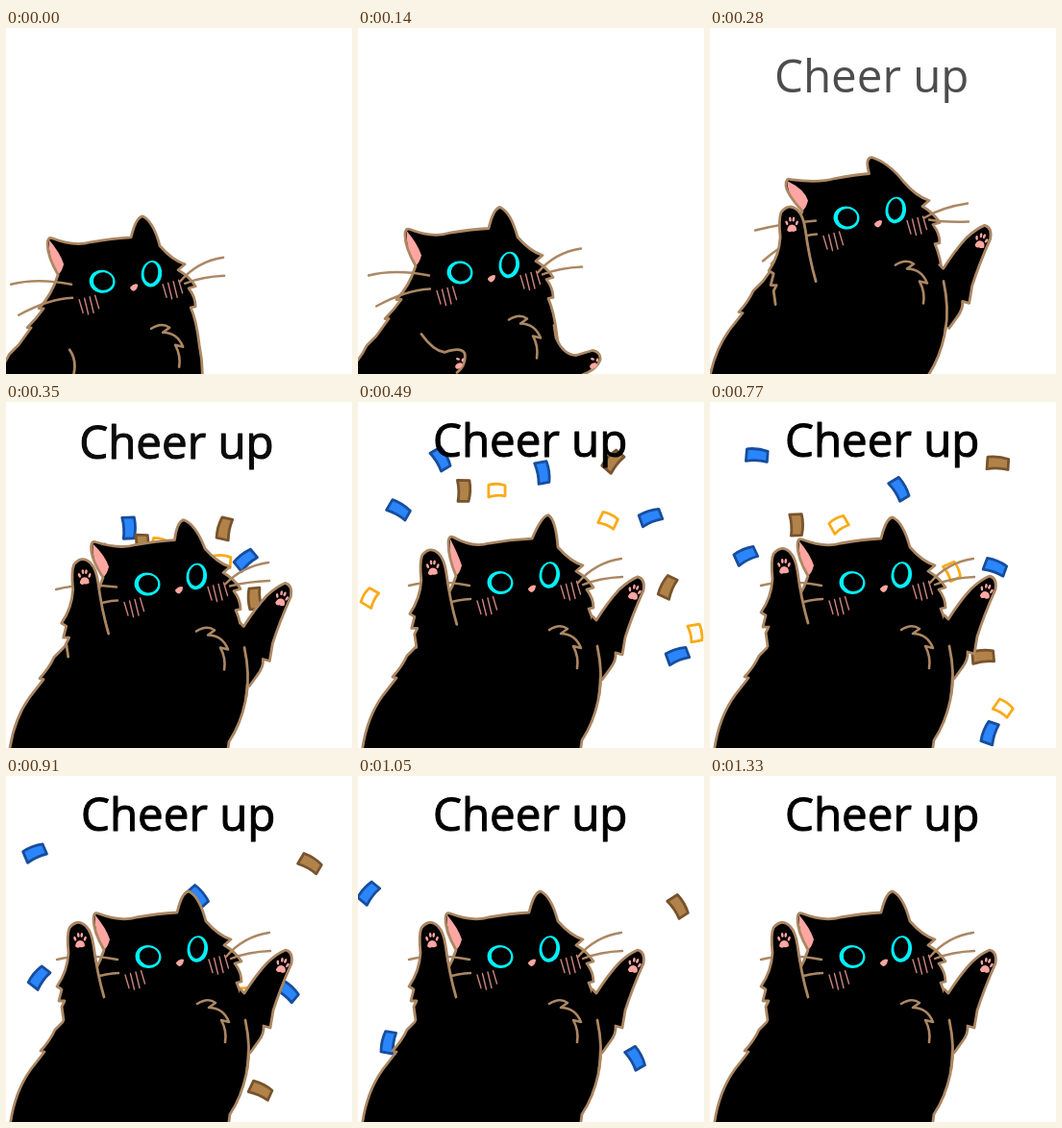
Animation of 360x360 px, one loop 1.4 s. Source, as an HTML page with a canvas:

```html
<!DOCTYPE html>
<html lang="en">
<head>
<meta charset="utf-8">
<title>Cheer up</title>
<style>
  html, body { margin: 0; width: 100%; height: 100%; overflow: hidden; background: #fff; }
  canvas { display: block; width: 100vw; height: 100vh; }
</style>
</head>
<body>
<canvas id="stage" width="360" height="360"></canvas>
<script>
const ctx = document.getElementById('stage').getContext('2d');
const LOOP = 1400, STEP = 70;
const FUR = '#000', LINE = '#ab8763', PINK = '#ffa6a2', CYAN = '#00f2fa', BLUSH = '#c9837e';
const BURST = 280, SPREAD = 490, CLEAR = 1260;

const clamp = (v, low, high) => Math.min(high, Math.max(low, v));
const bump = (t, centre, width) => Math.exp(-(((t - centre) / width) ** 2));

// 1 while the cat crouches, 0 once it has jumped up.
const crouch = t => 1 / (1 + Math.exp((t - 210) / 36));
// Ears and whiskers trail the jump, then swing past.
const sway = t => bump(t, 490, 70) / 2 - bump(t, 280, 60);

function stroke(d, color = LINE, width = 2.8) {
  ctx.strokeStyle = color;
  ctx.lineWidth = width;
  ctx.stroke(new Path2D(d));
}
function fill(d, color = FUR) {
  ctx.fillStyle = color;
  ctx.fill(new Path2D(d));
}
function oval(x, y, rx, ry, angle, color) {
  ctx.fillStyle = color;
  ctx.beginPath();
  ctx.ellipse(x, y, rx, ry, angle, 0, Math.PI * 2);
  ctx.fill();
}
function placed(x, y, angle, draw) {
  ctx.save();
  ctx.translate(x, y);
  ctx.rotate(angle);
  draw();
  ctx.restore();
}

// Where the burst has spread to: x, y and tilt in degrees.
const confetti = [
  { inner: '#2b85fb', edge: '#174d9c', width: 1.15,
    spots: [[86, 59, 65], [192, 73, 85], [42, 112, 35], [304, 120, -15], [332, 264, -15]] },
  { inner: '#b1834a', edge: '#77532d', width: 1.15,
    spots: [[110, 92, 95], [265, 62, -45], [322, 193, -60]] },
  { inner: '#fff', edge: '#f9ab18', width: .9,
    spots: [[144, 92, 5], [260, 123, 30], [12, 204, -55], [351, 240, 85]] }
];

// High pieces drift outwards and fall late, low ones swirl back in.
function flight(x, y, t) {
  if (t < SPREAD) {
    const u = 1 - ((SPREAD - t) / (SPREAD - BURST)) ** 2;
    return [180 + (x - 180) * u, 220 + (y - 220) * u];
  }
  const u = (t - SPREAD) / 280, gravity = 35;
  const drift = (x - 180) * clamp((115 - y) / 80, -.27, .4);
  const fall = 105 - 6400 / y - gravity;
  return [x + drift * u, y + fall * u + gravity * u * u];
}

function drawConfetti(t) {
  if (t <= BURST || t >= CLEAR) return;
  for (const { inner, edge, width, spots } of confetti) {
    const w = 9.5 * width;
    const card = `M${-w} -5 Q0 -8 ${w} -6 L${w + 1} 5 Q1 4 ${1 - w} 7.5 Z`;
    for (const [x, y, tilt] of spots) {
      const spin = 60 * Math.sin(x) * (t - SPREAD) / 280;
      placed(...flight(x, y, t), (tilt + spin) * Math.PI / 180, () => {
        fill(card, inner);
        stroke(card, edge, 2.8);
      });
    }
  }
}

function drawBody(t) {
  const s = sway(t), lx = 6 * s, ly = -5 * s, rx = 16 * s, ry = -5 * s;
  const outline = `M102 181 Q${91 + lx} 162 ${91 + lx} ${149 + ly} Q${91 + lx} ${141 + ly} ${96 + lx} ${143 + ly}
    Q119 152 136 147 Q158 143 ${178 + rx * .4} 142 Q${183 + rx} ${121 + ry} ${190 + rx} ${120 + ry}
    Q${201 + rx * .6} ${125 + ry} 208 151 Q221 166 234 170 L227 176 Q239 183 245 193 L238 195
    Q245 204 245 214 L240 215 Q246 228 249 254 Q255 284 250 310 Q245 334 233 352 L231 366
    L4 366 Q8 330 26 305 L40 287 L36 286 Q46 275 51 264 L61 254 L74 236 L70 236
    Q80 226 87 216 L82 216 Q95 203 102 181 Z`;
  fill(outline);
  fill(`M${93 + lx} ${145 + ly} Q104 158 108 170 Q106 178 102 181 Q${91 + lx} 163 ${93 + lx} ${145 + ly}`, PINK);
  stroke(outline);
}

function drawFace(t) {
  const w = 10 * Math.max(0, -sway(t));
  stroke(`M229 188 Q247 ${167 + w} 274 ${163 + w} M234 190 Q252 ${183 + w} 275 ${182 + w}
    M116 191 Q80 ${184 + w} 53 ${191 + w} M117 205 Q92 206 61 ${223 + w}`, LINE, 2.4);

  oval(148, 188, 13.5, 12, .15, CYAN);
  oval(149, 187.7, 10.2, 9.3, .15, FUR);
  oval(199.3, 180, 10.7, 13.8, .12, CYAN);
  oval(198.8, 179, 7.4, 11, .12, FUR);
  fill('M177 194 Q181 189 185 191 Q185 196 181 198 Q177 197 177 194', PINK);

  for (const [x, y] of [[124, 207], [211, 191]]) {
    for (let i = 0; i < 4; i++) {
      const top = y - i * 1.5, length = 18 - 3 * Math.abs(i - 1.5);
      stroke(`M${x + 5.5 * i} ${top} l4 ${length}`, BLUSH, 1.4);
    }
  }
  stroke('M199 237 Q210 230 218 236 L211 241 Q226 241 232 256 L224 254 Q230 265 228 277', LINE, 2.6);
}

function drawPaw(x, y, angle) {
  placed(x, y, angle, () => {
    fill('M-5 3 Q-4 -3 0 -3 Q5 -3 5 3 Q2 5 0 4 Q-3 6 -5 3', PINK);
    for (let i = -1.5; i < 2; i++) {
      oval(3.5 * i, 1.9 * i * i - 9, 1.3, 2.5, i * .25, PINK);
    }
  });
}

function drawRaisedArms(t) {
  const lag = Math.sqrt(crouch(t));
  placed(40 * lag, 68 * lag, 0, () => {
    const edge = `M60 254 L58 240 L61 234 L55 234 L58 222 L53 219 Q64 203 65 184
      Q63 165 66 158 Q74 148 83 156 Q89 162 91 176 Q95 206 102 230`;
    fill(edge + ' L110 262 L62 262 Z');
    stroke(edge);
    drawPaw(77, 174, 0);
  });
  placed(2 * lag, 42 * lag, 0, () => {
    const edge = `M244 222 L248 226 Q260 207 272 194 Q283 184 291 181 Q299 183 297 195
      Q285 222 278 244 L275 262 L268 260 Q269 268 262 277 L254 288`;
    fill(edge + ' L242 280 L236 242 Z');
    stroke(edge);
    drawPaw(286.5, 200, .3);
  });
  stroke('M249 254 Q255 282 251 305');
}

function drawLoweredArms(t) {
  if (t < 140) {
    stroke('M114 259 Q122 270 118 286');
    return;
  }
  const left = 'M108 252 Q120 269 132 271 Q149 265 153 272 Q155 284 145 292';
  fill(left);
  stroke(left);
  const right = 'M246 243 L248 256 Q256 274 269 274 L286 269 Q295 271 294 279 Q290 289 276 294';
  fill(right + ' L240 294 Z');
  stroke(right);
  for (const x of [147, 287]) {
    oval(x, 285, 4, 2.7, -.5, PINK);
    oval(x - 1, 278, 2, 1.3, .2, PINK);
    oval(x + 4, 279, 1.3, 2, .3, PINK);
  }
}

function drawText(t) {
  const c = crouch(t);
  ctx.save();
  ctx.globalAlpha = clamp(1 - 2.4 * c, 0, 1);
  ctx.font = '47.5px "Open Sans", "Noto Sans", sans-serif';
  ctx.fillStyle = ctx.strokeStyle = '#000';
  ctx.lineWidth = 1;
  ctx.translate(78 - 88 * c, 57 + 80 * c);
  ctx.fillText('Cheer up', 0, 0);
  if (t > 280) ctx.strokeText('Cheer up', 0, 0);
  ctx.restore();
}

function draw(t) {
  ctx.fillStyle = '#fff';
  ctx.fillRect(0, 0, 360, 360);
  ctx.lineCap = ctx.lineJoin = 'round';
  drawConfetti(t);
  const c = crouch(t);
  placed(-48 * c, 76 * c, 0, () => {
    drawBody(t);
    drawFace(t);
    if (t < 210) drawLoweredArms(t);
    else drawRaisedArms(t);
  });
  drawText(t);
}

const start = performance.now();
function tick() {
  const t = (performance.now() - start) % LOOP;
  draw(Math.floor(t / STEP) * STEP);
  requestAnimationFrame(tick);
}
tick();
</script>
</body>
</html>
```
